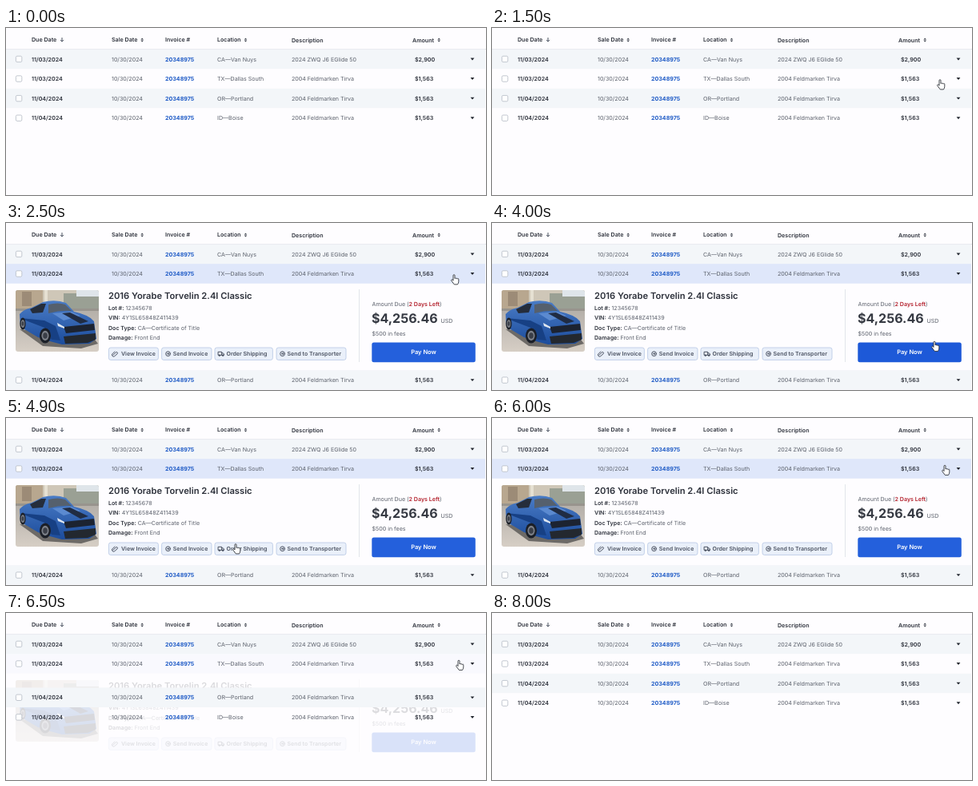
An HTML page for the animation above (8400 ms loop, 600 by 209 pixels).

```html
<!DOCTYPE html>
<html lang="en">
<head>
<meta charset="utf-8">
<title>Invoice table</title>
<style>
  html, body { margin: 0; width: 100%; height: 100%; overflow: hidden; background: #fefdff; }
  svg { display: block; width: 600px; height: 209px; }
  text {
    font: 400 7.1px Inter, "Liberation Sans", sans-serif;
    fill: #5b606b;
    text-rendering: geometricPrecision;
    white-space: pre;
  }
  .b { font-weight: 600; fill: #2c303a; }
  .link { font-weight: 700; fill: #1f5bc6; }
  .btn { font-weight: 600; font-size: 7px; fill: #4b5261; }
  .due { font-weight: 600; fill: #b3202c; }
  .title { font-weight: 600; font-size: 11.2px; fill: #2c303a; }
  .price { font-weight: 700; font-size: 16px; fill: #353942; }
  .pay { font-weight: 600; font-size: 7.5px; fill: #fff; text-anchor: middle; }
  .icon { fill: none; stroke: #414858; stroke-width: .95; stroke-linecap: round; stroke-linejoin: round; }
</style>
</head>
<body>
<svg id="stage" viewBox="0 0 600 209"></svg>
<script>
const LOOP = 8400;
const OPEN_AT = 1530, CLOSE_AT = 6310, TOGGLE_MS = 730;
const ROW_W = 599, ROW_H = 24.6, ROW_TOP = 26.5, PANEL_H = 108.5;

const text = (x, y, str, cls = '') => `<text x="${x}" y="${y}" class="${cls}">${str}</text>`;
const rect = (x, y, w, h, fill, extra = '') =>
  `<rect x="${x}" y="${y}" width="${w}" height="${h}" fill="${fill}" ${extra}/>`;
const path = (d, fill) => `<path d="${d}" fill="${fill}"/>`;
const icon = (x, y, d) => `<path class="icon" transform="translate(${x} ${y})" d="${d}"/>`;

// Header
const sorter = x => path(`M${x - 1.8} 14.5l1.8-2.1 1.8 2.1zm0 1l1.8 2.1 1.8-2.1z`, '#3a3f4a');
const header =
  text(32, 17.2, 'Due Date', 'b') + icon(70, 14.6, 'M0-2.2V2.2M-1.7 .6L0 2.3 1.7 .6') +
  text(132, 17.4, 'Sale Date', 'b') + sorter(170.2) +
  text(199, 17.2, 'Invoice #', 'b') +
  text(264, 17.2, 'Location', 'b') + sorter(299.5) +
  text(357, 17.5, 'Description', 'b') +
  text(508, 17.5, 'Amount', 'b') + sorter(541.2) +
  rect(0, 26, 600, .7, '#d3d7de');

// Table rows
const jetCar = '2004 Feldmarken Tirva';
const rows = [
  ['11/03/2024', 'CA—Van Nuys', '2024 ZWQ J6 EGlide 50', '$2,900'],
  ['11/03/2024', 'TX—Dallas South', jetCar, '$1,563'],
  ['11/04/2024', 'OR—Portland', jetCar, '$1,563'],
  ['11/04/2024', 'ID—Boise', jetCar, '$1,563'],
];
const rowMarkup = ([due, place, item, amount], i) => {
  const y = ROW_TOP + i * ROW_H, base = y + 15.1, mid = y + 12.5;
  const bg = i % 2 ? '' : rect(0, y, ROW_W, ROW_H, '#f3f6f9');
  const active = i === 1 ? rect(0, y, ROW_W, ROW_H, '#dfe7fa', 'id="active"') : '';
  return `<g class="row">${bg}${active}` +
    rect(12.4, mid - 3.8, 7.4, 7.4, '#fff', 'rx="1.5" stroke="#b4bac5" stroke-width=".8"') +
    text(32, base, due, 'b') + text(132, base, '10/30/2024') +
    text(199, base, '20348975', 'link') + text(264, base, place) +
    text(357, base, item) + text(511, base, amount, 'b') +
    path(`M580.6 ${mid - 1.5}h4.8l-2.4 2.9z`, '#22262f') + '</g>';
};

// Picture of the car, built from flat shapes
const wheel = (x, y, rx, ry) =>
  `<ellipse cx="${x}" cy="${y}" rx="${rx}" ry="${ry}" fill="#1b1f27"/>` +
  `<ellipse cx="${x}" cy="${y}" rx="${rx * .65}" ry="${ry * .65}" fill="#7c8088"/>` +
  `<ellipse cx="${x}" cy="${y}" rx="${rx * .4}" ry="${ry * .4}" fill="#3a3e47"/>`;
const photo = `<clipPath id="frame"><rect x="12" y="84" width="104" height="77" rx="3"/></clipPath>
  <linearGradient id="ground" x1="0" y1="0" x2="0" y2="1">
    <stop offset=".3" stop-color="#b3aea8"/><stop offset="1" stop-color="#d6cec5"/>
  </linearGradient>
  <linearGradient id="paint" x1="0" y1="0" x2="0" y2="1">
    <stop offset="0" stop-color="#4a7cc6"/><stop offset="1" stop-color="#1c4c9c"/>
  </linearGradient><g clip-path="url(#frame)">` +
  rect(12, 84, 104, 77, 'url(#ground)') +
  rect(12, 84, 104, 25, '#cfc7b8') + rect(12, 84, 34, 24, '#b8a78f') +
  rect(20, 86, 12, 18, '#9c8b77') + rect(48, 84, 4, 24, '#e6e0d2') +
  rect(72, 88, 44, 19, '#9aa094') + rect(88, 84, 28, 8, '#dfe5ea') +
  rect(12, 107, 104, 3, '#98948d') +
  path('M17 133L46 154 94 157 115 151 108 142z', '#6d6a67') +
  path('M17 114Q22 108 32 106L46 99Q62 95 75 100L85 111Q104 115 110 123L113 145 104 151 70 152 55 148 40 143 18 130z', 'url(#paint)') +
  path('M30 108L44 101 50 101 46 112 33 113z', '#252d3b') +
  path('M53 102Q65 99 74 102L82 110Q68 109 53 113z', '#55606d') +
  path('M58 113L82 111 93 116 72 122z', '#5b8ad0') +
  path('M70 113L80 112 103 123 93 126z', '#202c43') +
  path('M18 119L48 122 62 129 68 147 57 146 48 131 22 121z', '#174084') +
  path('M72 130L110 126 111 134 75 138z', '#1c2331') +
  path('M72 142L112 138 112 146 102 150 74 151z', '#23282f') +
  path('M64 125L73 130 73 132 65 129z', '#dfe7f1') +
  wheel(49, 141, 7, 9.5) + wheel(21, 126, 3.6, 7.5) + '</g>';

// Detail panel
const field = (y, label, value) =>
  `<text x="128" y="${y}"><tspan class="b">${label}:</tspan> ${value}</text>`;
const clip = 'M-2.4 1.5L.9-1.8a1.2 1.2 0 0 1 1.8 1.8L-.7 3a2 2 0 0 1-2.8-2.8L-.5-2.8';
const send = 'M2.9 0a2.9 2.9 0 1 1-5.8 0a2.9 2.9 0 1 1 5.8 0M-1.3 0H1.3M.3-1.1L1.4 0 .3 1.1';
const truck = 'M-3.5-2.4H.7V1.6H-3.5zM.7-.9H2.4L3.5.4V1.6H.7M-1.4 2.1a.8.8 0 1 1-1.6 0a.8.8 0 1 1 1.6 0M2.9 2.1a.8.8 0 1 1-1.6 0a.8.8 0 1 1 1.6 0';
const action = (x, w, shape, iconX, textX, label) =>
  rect(x, 156, w, 15.4, '#eaf0fa', 'rx="2.5" stroke="#b7c7e4" stroke-width=".8"') +
  icon(iconX, 163.7, shape) + text(textX, 166.2, label, 'btn');

const panel = '<g id="panel">' + photo +
  text(128, 95.1, '2016 Yorabe Torvelin 2.4I Classic', 'title') +
  field(108.6, 'Lot #', '12345678') +
  field(121.2, 'VIN', '4Y1SL65848Z411439') +
  field(133.8, 'Doc Type', 'CA—Certificate of Title') +
  field(146.3, 'Damage', 'Front End') +
  action(128.4, 62, clip, 136.4, 144, 'View Invoice') +
  action(194.6, 62.4, send, 202.6, 208.8, 'Send Invoice') +
  action(261, 72.4, truck, 269, 275.5, 'Order Shipping') +
  action(338, 87, send, 345.6, 351.5, 'Send to Transporter') +
  rect(441.2, 83, .7, 91, '#d6dae1') +
  `<text x="457.5" y="104.2">Amount Due (<tspan class="due">2 Days Left</tspan>)</text>` +
  text(457, 125.3, '$4,256.46', 'price') + text(543.5, 125.2, 'USD') +
  text(457.5, 140.6, '$500 in fees') +
  rect(457.3, 149.4, 129.5, 24.8, '#2460dc', 'rx="2.5" id="pay"') +
  text(522, 164.4, 'Pay Now', 'pay') + '</g>';

const hand = `<g id="cursor"><path d="M3 8V1.7a1 1 0 0 1 2 0V5.4a.9.9 0 0 1 1.7.2a.9.9 0 0 1 1.6.5
  a.8.8 0 0 1 1.5.6V9.2c0 1.6-.6 2.5-1.3 3.7H4.3C3.1 11.4 1.8 9.8.7 8.1a.95.95 0 0 1 1.5-1.1z"
  fill="#fff" stroke="#23262e" stroke-width=".85" stroke-linejoin="round"/></g>`;

const stage = document.getElementById('stage');
stage.innerHTML = header + panel + rows.map(rowMarkup).join('') + hand;
const $ = id => document.getElementById(id);
const rowEls = document.querySelectorAll('.row');

// Timing
const clamp = x => Math.min(1, Math.max(0, x));
const span = (t, a, b) => clamp((t - a) / (b - a));
const easeInOut = x => x < .5 ? 4 * x ** 3 : 1 - (2 - 2 * x) ** 3 / 2;
const easeOutExpo = x => x >= 1 ? 1 : 1 - 2 ** (-10 * x);

// start, end, target x, target y, downward bow
const moves = [
  [60, 700, 556, 64, 0],
  [3420, 3980, 549, 147.5, 0],
  [4240, 4900, 283, 157, 11],
  [5220, 5800, 562, 58.5, 0],
  [6530, 6900, 604, 70, 0],
];
function cursorAt(t) {
  let x = 582, y = 102;
  for (const [a, b, toX, toY, bow] of moves) {
    if (t < a) break;
    const k = easeInOut(span(t, a, b));
    x += (toX - x) * k;
    y += (toY - y) * k + bow * Math.sin(Math.PI * k);
  }
  return [x, y];
}

function draw(t) {
  const open = easeOutExpo(span(t, OPEN_AT, OPEN_AT + TOGGLE_MS)) -
               easeOutExpo(span(t, CLOSE_AT, CLOSE_AT + TOGGLE_MS));
  $('panel').setAttribute('opacity', open);
  $('active').setAttribute('opacity', open);
  for (const i of [2, 3]) rowEls[i].setAttribute('transform', `translate(0 ${PANEL_H * open})`);

  const [x, y] = cursorAt(t);
  const press = t >= 1100 && t < 1200 ? .88 : 1;
  $('cursor').setAttribute('transform',
    `translate(${x + 5 * (1 - press)} ${y + 6.5 * (1 - press)}) scale(${press})`);
  $('cursor').setAttribute('opacity', t < 6900 ? span(t, 60, 220) : 0);
  const hover = x > 453 && x < 583 && y > 147 && y < 173;
  $('pay').setAttribute('fill', hover ? '#1d59d8' : '#2460dc');
}

function tick() {
  draw(performance.now() % LOOP);
  requestAnimationFrame(tick);
}
tick();
</script>
</body>
</html>
```
